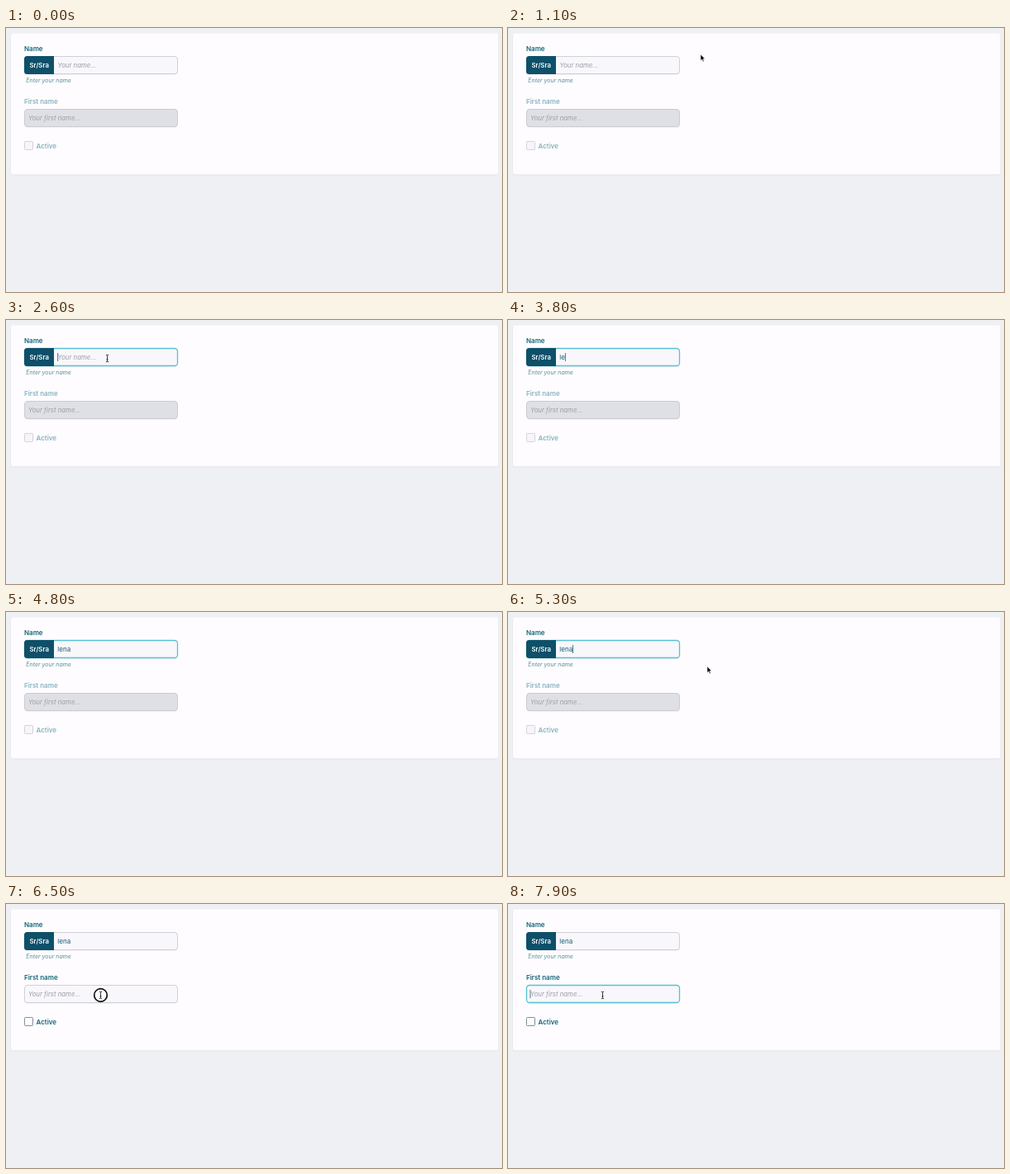
An HTML page for the animation above (8 s loop, 600 px wide and 320 px high).

```html
<!DOCTYPE html>
<html lang="en">
<head>
<meta charset="utf-8">
<style>
  html, body { margin: 0; width: 100%; height: 100%; overflow: hidden; background: #eff0f4; }
  svg { display: block; font: 7.8px Inter, "Open Sans", sans-serif; }
  .label { font-size: 8px; font-weight: 600; fill: #126579; }
  .hint { font-size: 7px; font-style: italic; fill: #55909c; }
  .placeholder { font-style: italic; fill: #9d9da7; }
  .value { font-size: 8px; fill: #155e72; }
  .field { fill: #f8f7fb; stroke: #d0d0d8; }
  .field.focus { stroke: #56c1d5; stroke-width: 1.3; }
  .field.disabled { fill: #dfe0e5; stroke: #cccdd3; }
  .box { fill: #fefdfe; stroke: #7f929b; }
  .box.disabled { fill: #f7f5f9; stroke: #d5d2db; }
  .label.disabled { fill: #86b4c1; }
  .caret { fill: #155e72; }
</style>
</head>
<body>
<svg width="600" height="320" viewBox="0 0 600 320">
  <rect width="600" height="320" fill="#eff0f4"/>
  <rect x="5.5" y="7" width="590.5" height="171.5" rx="3.5" fill="#e3e4e9"/>
  <rect x="6" y="6.5" width="589.5" height="171" rx="3" fill="#fefcfe"/>

  <text class="label" x="22" y="27.8">Name</text>
  <rect x="22.5" y="35.3" width="185" height="21.2" rx="3.5" fill="#e5e5ea"/>
  <rect id="nameField" class="field" x="22.5" y="34.5" width="185" height="21" rx="3.5"/>
  <path d="M58 34H25.5a3.5 3.5 0 0 0-3.5 3.5v15a3.5 3.5 0 0 0 3.5 3.5H58z" fill="#0e5069"/>
  <text x="28.5" y="47.8" font-weight="600" fill="#fff">Sr/Sra</text>
  <text id="nameHint" class="placeholder" x="62.5" y="47.8">Your name...</text>
  <text id="nameValue" class="value" x="62.3" y="47.8"></text>
  <rect id="nameCaret" class="caret" y="40" width="0.8" height="10"/>
  <text class="hint" x="24.3" y="65.5">Enter your name</text>

  <text id="firstLabel" class="label" x="22" y="91.8">First name</text>
  <rect x="22.5" y="99.3" width="185" height="21.2" rx="3.5" fill="#e5e5ea"/>
  <rect id="firstField" class="field" x="22.5" y="98.5" width="185" height="21" rx="3.5"/>
  <text class="placeholder" x="27" y="111.8">Your first name...</text>
  <rect id="firstCaret" class="caret" x="26.6" y="104" width="0.8" height="10"/>

  <rect id="activeBox" class="box" x="22.5" y="137.5" width="10" height="10" rx="0.8"/>
  <text id="activeLabel" class="label" x="36.5" y="145.5">Active</text>

  <circle id="ring" r="7.8" fill="#fff" fill-opacity="0.5" stroke="#111" stroke-width="1.7"/>
  <path id="arrow" d="M0 0V7.4L1.7 5.9 2.9 8.7 4.1 8.2 2.9 5.5H5.2Z" fill="#000" stroke="#fff" stroke-width="0.5"/>
  <path id="beam" d="M-1.6-4.3Q0-4.3 0-3.2Q0-4.3 1.6-4.3M0-3.2V3.2M-1.6 4.3Q0 4.3 0 3.2Q0 4.3 1.6 4.3M-1 1.4H1" fill="none" stroke="#222" stroke-width="0.9"/>
</svg>
<script>
const LOOP = 8000, STEP = 100;
const NAME = "lena", KEY_TIMES = [3300, 3800, 4100, 4300];
const el = Object.fromEntries([...document.querySelectorAll("[id]")].map(n => [n.id, n]));

// Pointer stops: time, x, y
const TRAVEL_IN = [[300, 551, 33], [400, 462, 30], [700, 462, 30], [900, 346, 26],
  [1100, 233, 32], [1300, 150, 42], [1500, 122.5, 46.5]];
const TRAVEL_OUT = [[4800, 122.5, 46.5], [5300, 241, 66]];
const TRAVEL_FIRST = [[5700, 241, 66], [6400, 114.5, 110.5]];
// Clicks: start, start of fade, end, x, y
const CLICKS = [[1500, 1700, 1900, 122.5, 46.5], [5500, 5800, 6000, 244, 70.5], [6500, 6700, 6900, 114.5, 110.5]];

const clamp = v => Math.max(0, Math.min(1, v));
const smooth = p => p * p * (3 - 2 * p);
const show = (node, on) => node.setAttribute("visibility", on ? "visible" : "hidden");
const place = (node, x, y) => node.setAttribute("transform", `translate(${x} ${y})`);

function along(stops, t, ease) {
  let i = 0;
  while (i < stops.length - 2 && t >= stops[i + 1][0]) i++;
  const [a, b] = [stops[i], stops[i + 1]];
  const p = ease(clamp((t - a[0]) / (b[0] - a[0])));
  return [a[1] + (b[1] - a[1]) * p, a[2] + (b[2] - a[2]) * p];
}

function pointerAt(t) {
  if (t < 300 || (t >= 3300 && t < 4900)) return null;
  if (t < 3300) return along(TRAVEL_IN, t, p => p);
  return t < 5700 ? along(TRAVEL_OUT, t, smooth) : along(TRAVEL_FIRST, t, smooth);
}

const blink = (t, since) => Math.floor((t - since) / 500) % 2 === 0;

function drawPointer(t) {
  const pos = pointerAt(t);
  const overField = pos && pos[0] > 58 && pos[0] < 208 &&
    ((pos[1] > 34 && pos[1] < 56) || (t >= 5600 && pos[1] > 98 && pos[1] < 120));
  show(el.arrow, pos && !overField);
  show(el.beam, overField);
  if (pos) place(overField ? el.beam : el.arrow, ...pos);

  const click = CLICKS.find(c => t >= c[0] && t < c[2]);
  show(el.ring, click);
  if (click) {
    const [, fade, end, x, y] = click;
    place(el.ring, x, y);
    el.ring.setAttribute("opacity", 1 - clamp((t - fade) / (end - fade)));
  }
}

function draw(t) {
  const typed = KEY_TIMES.filter(k => t >= k).length;
  const nameFocus = t >= 1600 && t < 5500;
  const firstFocus = t >= 6600;
  const enabled = t >= 5600;

  el.nameValue.textContent = NAME.slice(0, typed);
  show(el.nameHint, !typed);
  el.nameField.classList.toggle("focus", nameFocus);
  el.nameCaret.setAttribute("x", 62.3 + (typed ? el.nameValue.getComputedTextLength() : 0));
  show(el.nameCaret, nameFocus && blink(t, typed ? KEY_TIMES[typed - 1] : 1600));

  for (const id of ["firstLabel", "firstField", "activeBox", "activeLabel"])
    el[id].classList.toggle("disabled", !enabled);
  el.firstField.classList.toggle("focus", firstFocus);
  show(el.firstCaret, firstFocus && blink(t, 6600));

  drawPointer(t);
}

const start = performance.now();
function tick() {
  const t = Math.max(0, performance.now() - start) % LOOP;
  draw(Math.floor(t / STEP) * STEP);
  requestAnimationFrame(tick);
}
tick();
</script>
</body>
</html>
```
